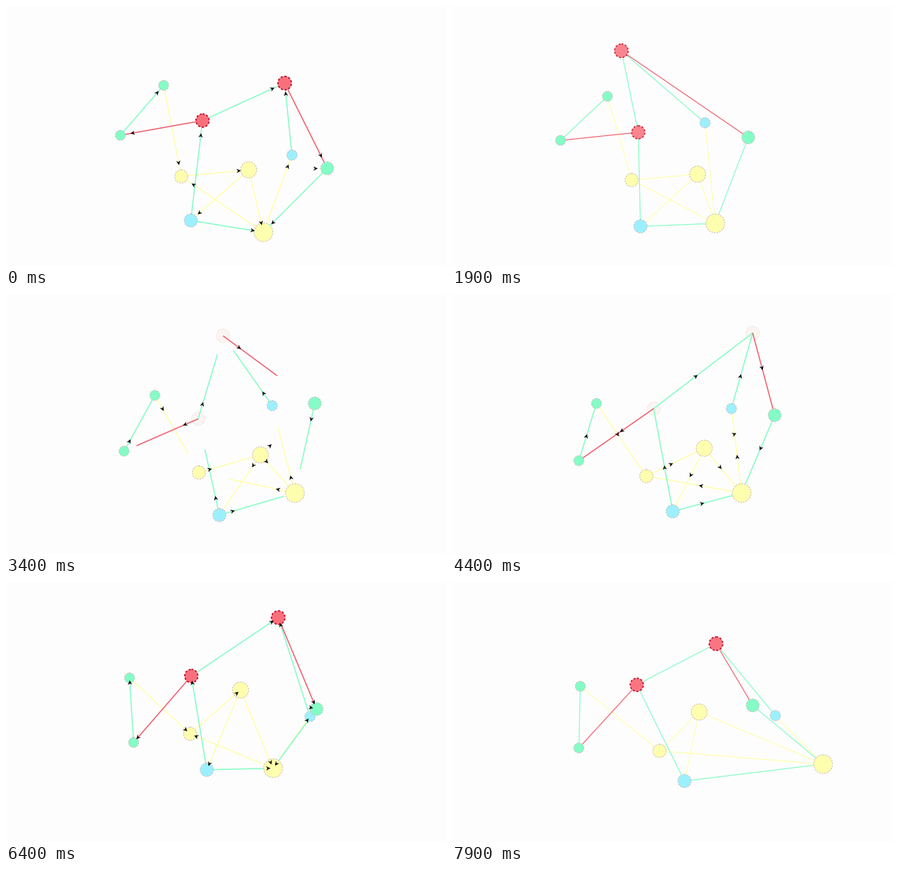
Write a matplotlib script that moves like this. It is 600 px wide and 354 px high and loops after 8000 ms.

```python
import numpy as np
import matplotlib.pyplot as plt
from matplotlib.animation import FuncAnimation
from matplotlib.patches import Circle, Polygon

W, H, DPI = 600, 354, 100
FRAMES, STEP = 80, 100
PX = 72 / DPI

GREEN, YELLOW = "#84fcc6", "#feffae"
BLUE, RED = "#9cf0fe", "#f9707c"
PALE = np.array([0.985, 0.955, 0.95])
RED_RGB = np.array([0.976, 0.44, 0.486])
RIM, RED_RIM = np.array([0.80, 0.74, 0.74]), np.array([0.74, 0.0, 0.12])
RED_LINE = "#ee5f6e"

# The cycle of pulses along the links
CYCLE, PULSE, START = 6100, 4000, 2700
GROWTH = 0.131  # px per ms

TIMES = [0, 1900, 3400, 4400, 5700, 7100, 7900]


class Node:
    """A dotted disc that glides through a few waypoints."""

    def __init__(self, color, r, xs, ys, extra=()):
        self.color, self.r = color, r
        pts = sorted([*zip(TIMES, xs, ys), *extra])
        self.t, x, y = (np.array(c, float) for c in zip(*pts))
        self.curves = [(v, slopes(self.t, v)) for v in (x, y)]

    def at(self, ms):
        return np.array([hermite(self.t, v, m, ms) for v, m in self.curves])


def slopes(t, v):
    d = np.diff(v) / np.diff(t)
    m = np.zeros(len(v))
    m[0], m[-1] = d[0], d[-1]
    for i in range(1, len(d)):
        if d[i - 1] * d[i] > 0:
            m[i] = 2 * d[i - 1] * d[i] / (d[i - 1] + d[i])
    return m


def hermite(t, v, m, ms):
    i = int(np.clip(np.searchsorted(t, ms, "right") - 1, 0, len(t) - 2))
    h = t[i + 1] - t[i]
    s = (ms - t[i]) / h
    a, b = (1 + 2 * s) * (1 - s) ** 2, s * s * (3 - 2 * s)
    return (a * v[i] + b * v[i + 1]
            + h * s * (1 - s) * ((1 - s) * m[i] - s * m[i + 1]))


nodes = {
    "a": Node(GREEN, 6.8, [215, 212, 203, 197, 190, 162, 175],
              [108, 123, 138, 149, 127, 135, 142], [(6300, 170, 130)]),
    "b": Node(GREEN, 6.8, [156, 148, 161, 173, 173, 175, 173],
              [176, 183, 214, 227, 211, 226, 226], [(2500, 142, 194)]),
    "c": Node(RED, 9, [268, 254, 262, 275, 272, 247, 252],
              [156, 172, 170, 156, 149, 129, 140], [(6300, 254, 128)]),
    "d": Node(RED, 9.3, [380, 231, 296, 410, 374, 366, 360],
              [105, 61, 57, 53, 86, 77, 84],
              [(900, 370, 106), (6450, 371, 48)]),
    "e": Node(BLUE, 7, [390, 345, 363, 381, 392, 436, 441],
              [203, 159, 152, 156, 181, 184, 182]),
    "f": Node(GREEN, 8.8, [438, 404, 421, 440, 444, 403, 410],
              [221, 179, 149, 165, 192, 154, 168]),
    "g": Node(YELLOW, 9, [239, 245, 263, 265, 251, 253, 283],
              [232, 237, 243, 248, 235, 202, 230], [(6300, 251, 208)]),
    "h": Node(YELLOW, 11, [331, 335, 347, 344, 338, 315, 337],
              [223, 229, 219, 210, 210, 136, 177], [(6300, 321, 150)]),
    "i": Node(BLUE, 9, [252, 257, 291, 301, 280, 273, 317],
              [292, 300, 301, 296, 287, 251, 271], [(6300, 274, 257)]),
    "j": Node(YELLOW, 12.8, [351, 359, 394, 395, 376, 361, 506],
              [308, 296, 271, 271, 290, 252, 248],
              [(6300, 365, 254), (7500, 430, 290)]),
}

# Source, target and color; the last link shows only its arrow
links = [(*pair, color) for color, pairs in (
    (YELLOW, "ag gh hi hj jg je"), (GREEN, "ba cd ic ed fj ij"),
    (RED_LINE, "cb df"), ("none", "hf")) for pair in pairs.split()]

fig = plt.figure(figsize=(W / DPI, H / DPI), dpi=DPI, facecolor="#fefdfd")
ax = fig.add_axes([0, 0, 1, 1])
ax.set(xlim=(0, W), ylim=(H, 0))
ax.axis("off")

HEAD = np.array([[3.2, 0], [-2.8, 2.9], [-0.9, 0], [-2.8, -2.9]])
lines, arrows, discs = [], [], {}
for _, _, color in links:
    lines += ax.plot([], [], color=color, zorder=2, solid_capstyle="butt")
    arrows.append(ax.add_patch(Polygon(HEAD, fc="black", ec="none", zorder=4)))
for key, n in nodes.items():
    discs[key] = ax.add_patch(Circle(
        (0, 0), n.r, fc=n.color, ec=RIM, lw=1.1 * PX,
        ls=(0, (1.8, 1.5)), zorder=3))


def smooth(x):
    x = np.clip(x, 0, 1)
    return x * x * (3 - 2 * x)


def red_level(ms):
    """1 while the alert nodes are lit, 0 while they are faded."""
    p = (ms - 1700) % CYCLE
    return 1 - smooth(p / 800) + smooth((p - 4100) / 250)


def draw(k):
    ms = k * STEP
    phase = (ms - START) % CYCLE
    active = phase < PULSE
    pos = {key: n.at(ms) for key, n in nodes.items()}
    lit = red_level(ms)

    for key, disc in discs.items():
        disc.center = pos[key]
        if nodes[key].color == RED:
            disc.set_facecolor(PALE + (RED_RGB - PALE) * lit)
            rim = PALE - 0.06
            disc.set_edgecolor(rim + (RED_RIM - rim) * lit)
            disc.set_linewidth((1.0 + 0.6 * lit) * PX)
            disc.set_zorder(3 if lit > 0.4 else 1)

    for (src, dst, color), line, arrow in zip(links, lines, arrows):
        p, q = pos[src], pos[dst]
        span = q - p
        dist = np.hypot(*span)
        u = span / dist
        end = p + u * min(dist, GROWTH * phase) if active else q
        line.set_data(*zip(p, end))
        line.set_linewidth((1.5 if active else 1.15) * PX)
        arrow.set_visible(bool(active))
        turn = np.array([u, [-u[1], u[0]]])
        arrow.set_xy(p + span * phase / PULSE + HEAD @ turn)
    return [*lines, *arrows, *discs.values()]


anim = FuncAnimation(fig, draw, frames=FRAMES, interval=STEP,
                     init_func=lambda: draw(0), repeat=True, repeat_delay=0)
plt.show()
```
